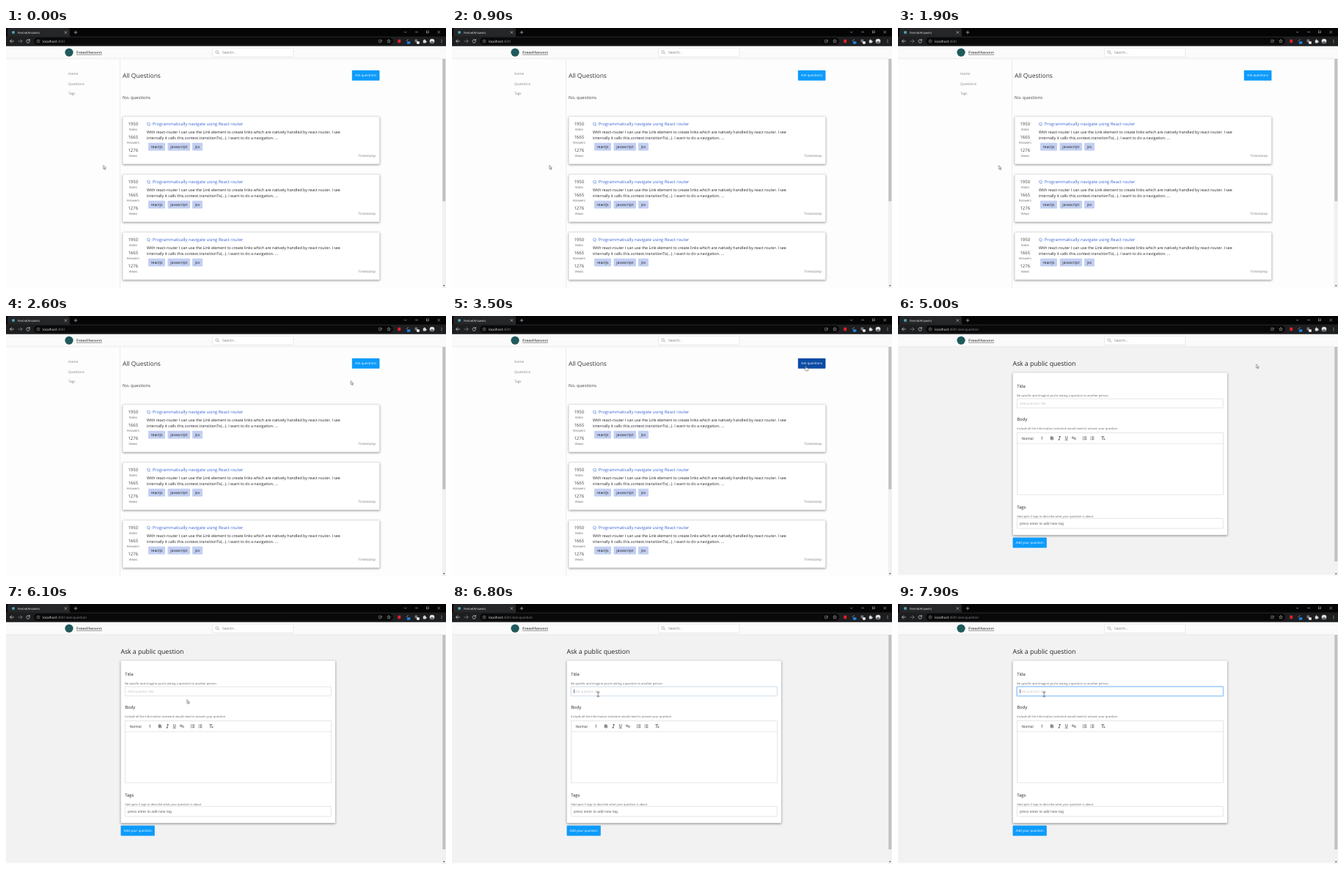
An HTML page that plays this animation: 600x355 px, repeating every 8000 ms.

```html
<!DOCTYPE html>
<html lang="en">
<head>
<meta charset="utf-8">
<title>Questions</title>
<style>
html, body { margin: 0; width: 100%; height: 100%; overflow: hidden; background: #fff; }
svg { display: block; width: 100%; height: 100%; }
text { font-family: "Open Sans", "Noto Sans", sans-serif; text-rendering: geometricPrecision; }
.arial { font-family: "Liberation Sans", Arial, sans-serif; }
.brand { font: bold 5.34px "Liberation Serif", "Times New Roman", serif; text-decoration: underline; }
.mid { text-anchor: middle; }
.medium { font-weight: 500; }
.card { fill: #fff; stroke: #d4d4d4; stroke-width: .4; filter: drop-shadow(0 1.2px 1.6px rgba(0, 0, 0, .42)); }
.line { fill: none; stroke-linecap: round; stroke-linejoin: round; }
.box { fill: #fff; stroke: #d6d6d6; stroke-width: .6; }
</style>
</head>
<body>
<svg id="stage" viewBox="0 0 600 355" preserveAspectRatio="none"></svg>
<script>
const LOOP = 8000;
const BRAND = 'FennelAnswers';

const text = (x, y, size, fill, str, cls = '') =>
  `<text x="${x}" y="${y}" font-size="${size}" fill="${fill}" class="${cls}">${str}</text>`;
const rect = (x, y, w, h, fill, r = 0, more = '') =>
  `<rect x="${x}" y="${y}" width="${w}" height="${h}" rx="${r}" fill="${fill}" ${more}/>`;
const box = (x, y, w, h, cls, r = 0) =>
  `<rect x="${x}" y="${y}" width="${w}" height="${h}" rx="${r}" class="${cls}"/>`;
const dot = (x, y, r, fill) => `<circle cx="${x}" cy="${y}" r="${r}" fill="${fill}"/>`;
const line = (d, stroke, w = .7) =>
  `<path d="${d}" class="line" stroke="${stroke}" stroke-width="${w}"/>`;

function browser() {
  const ink = '#d8d8d8';
  return rect(0, 0, 600, 24.5, '#050505')
    + '<path d="M2 12V3Q2 0 5 0H84Q87 0 87 3V12Z" fill="#252628"/>'
    + rect(0, 11.5, 600, 13, '#1d1e20')
    + rect(38, 13, 490, 10, '#09090a', 5)
    + dot(10, 6, 2, '#4ba6b8')
    + text(16, 7.6, 4.3, '#e6e6e6', BRAND)
    + line('M80 4.6l2.8 2.8m0-2.8l-2.8 2.8', ink, .6)
    + line('M93 6h4m-2-2v4', ink, .6)
    + line('M543 5l1.5 1.5L546 5M558.5 5.5h3M588.8 4.2l2.8 2.8m0-2.8l-2.8 2.8', ink, .5)
    + rect(573.5, 4, 2.8, 2.8, 'none', 0, `stroke="${ink}" stroke-width=".5"`)
    + line('M10.5 18h-5m2.2-2.2L5.5 18l2.2 2.2', ink)
    + line('M17 18h5m-2.2-2.2L22 18l-2.2 2.2', '#8a8a8a')
    + line('M32 16.6a2.3 2.3 0 1 0 .4 2M32.3 15.4v1.6h-1.6', ink)
    + '<circle cx="44" cy="18" r="2" fill="none" stroke="#aaa" stroke-width=".5"/>'
    + line('M44 17.8v1M44 16.9v.1', '#aaa', .5)
    + text(50, 19.7, 4.6, '#f0f0f0', 'localhost<tspan fill="#8b8d90">:3001<tspan id="path">/ask-question</tspan></tspan>')
    + rect(508.5, 16.2, 3.6, 3.6, 'none', .5, 'stroke="#aaa" stroke-width=".5"')
    + line('M510 18.4q.5-1.4 2.6-1.5', '#aaa', .5)
    + line('M522 15.7l.7 1.5 1.6.2-1.2 1.1.3 1.6-1.4-.8-1.4.8.3-1.6-1.2-1.1 1.6-.2z', ink, .45)
    + rect(534.2, 15.8, 4, 4.4, '#e0202f', 1)
    + line('M546 17.5l2.2-1.7', '#999', .9)
    + rect(546.8, 18.2, 4.6, 3.6, '#1b84e0', .8)
    + rect(557.5, 15.6, 3.6, 4, '#777', .6)
    + rect(560, 18.3, 3.8, 3.4, '#f2f2f2', .8)
    + rect(568.8, 16.8, 3.8, 3.6, ink, .5) + dot(570.6, 16.4, 1, ink) + dot(572.9, 18.6, .9, ink)
    + dot(581, 18, 3.3, '#dedede') + '<path d="M578.2 19.6Q581 16.8 583.8 19.6Q581 22.4 578.2 19.6Z" fill="#555"/>'
    + [16.2, 18, 19.8].map(y => dot(594, y, .5, ink)).join('');
}

function header() {
  return rect(0, 24.5, 600, 17.5, '#fafafa')
    + rect(0, 41.6, 595, .6, '#dedede')
    + dot(86, 33.3, 5.6, '#1f5a5c')
    + text(96, 35.3, 5.34, '#555', BRAND, 'brand')
    + rect(281.8, 27.2, 110, 12.3, '#fff', 1, 'stroke="#dcdcdc" stroke-width=".6"')
    + '<circle cx="287.6" cy="32.6" r="1.8" fill="none" stroke="#888" stroke-width=".6"/>'
    + line('M289 34l1.7 1.7', '#888', .6)
    + text(295, 35, 4.8, '#757575', 'Search...');
}

function scrollbar(end) {
  return rect(594.6, 24.5, 5.4, 330.5, '#f1f1f1')
    + rect(595.3, 30, 4, end - 30, '#c1c1c1')
    + '<path d="M595.9 28.7l1.4-1.6 1.4 1.6z" fill="#777"/>'
    + '<path d="M595.9 351.3l1.4 1.6 1.4-1.6z" fill="#444"/>';
}

function question(dy) {
  const stats = [['1950', 'Votes'], ['1665', 'Answers'], ['1276', 'Views']];
  const tags = [['reactjs', 194, 23], ['javascript', 220.5, 30.5], ['jsx', 254, 14]];
  return `<g transform="translate(0 ${dy})">`
    + box(159.2, 121, 350.2, 64.8, 'card', .5)
    + stats.map(([n, label], i) =>
        text(173.3, 133.2 + i * 17.8, 6, '#444', n, 'mid')
        + text(173.3, 139.9 + i * 17.8, 4.4, '#666', label, 'mid')).join('')
    + text(192, 133.1, 5.87, '#3a67d2', 'Q: Programmatically navigate using React router')
    + text(192, 144, 5.32, '#222', 'With react-router I can use the Link element to create links which are natively handled by react router. I see')
    + text(192, 151.8, 5.32, '#222', 'internally it calls this.context.transitionTo(...). I want to do a navigation. ...')
    + tags.map(([name, x, w]) =>
        rect(x, 156.8, w, 10.6, '#c2cff2', .8) + text(x + w / 2, 163.9, 5.2, '#222', name, 'mid')).join('')
    + text(480.5, 175.9, 4.5, '#777', 'Timestamp')
    + '</g>';
}

function listPage() {
  return '<g id="list">' + rect(0, 42, 600, 313, '#fdfdfd')
    + rect(155, 42, .6, 313, '#e2e2e2')
    + ['Home', 'Questions', 'Tags'].map((s, i) => text(85, 64 + i * 13.5, 4.65, '#808080', s)).join('')
    + text(159, 68.3, 8.48, '#333', 'All Questions')
    + text(159, 97.4, 5.9, '#444', 'No. questions')
    + '<rect id="ask" x="471.8" y="57.8" width="37.6" height="14" rx=".8" fill="#0d9bfb"/>'
    + text(490.6, 66.4, 4.5, '#fff', 'Ask questions', 'mid')
    + [0, 79, 158].map(question).join('')
    + scrollbar(236.5) + '</g>';
}

function editorTools() {
  const ink = '#444';
  const rows = [164.9, 166.8, 168.7];
  return text(168.4, 168.7, 5, ink, 'Normal', 'arial medium')
    + `<path d="M195.2 166.2l1.1-1.4 1.1 1.4zM195.2 167.4l1.1 1.4 1.1-1.4z" fill="${ink}"/>`
    + line('M208.8 164.8h1.6a1 1 0 0 1 0 2h-1.6zM208.8 166.8h2a1 1 0 0 1 0 2h-2z', ink, .8)
    + line('M219.6 164.7h2M218.6 168.9h2M220.7 164.7l-1 4.2', ink)
    + line('M228.4 164.5v2a1.3 1.3 0 0 0 2.6 0v-2M228 169.2h3.4', ink)
    + line('M239.6 166l-.7-.7a.9.9 0 0 0-1.3 1.3l1.1 1.1M240 167.4l.8.8a.9.9 0 0 0 1.3-1.3l-1.2-1.2M239 166l1.9 1.9', ink, .75)
    + rows.map(y => line(`M254.2 ${y}h2.8M264.2 ${y}h2.8`, ink)
        + line(`M252.4 ${y - .4}v.8M262.4 ${y}h.1`, ink, .6)).join('')
    + line('M277.4 164.8h3.6M279.4 164.8l-.8 4M280.6 167.4l1.5 1.5m0-1.5l-1.5 1.5', ink);
}

function formPage() {
  const field = (y, label, hint) =>
    text(162.2, y, 5.9, '#222', label, 'medium') + text(162.2, y + 12, 4, '#666', hint);
  return '<g id="form">' + rect(0, 42, 600, 311, '#f2f2f3') + rect(0, 353, 600, 2, '#fbfbfb')
    + text(156.4, 67.7, 8.7, '#222', 'Ask a public question')
    + box(156.6, 77.2, 292.4, 221.8, 'card', .5)
    + field(97.8, 'Title', 'Be specific and imagine you\'re asking a question to another person')
    + field(143.1, 'Body', 'Include all the information someone would need to answer your question')
    + field(263.2, 'Tags', 'Add upto 5 tags to describe what your question is about')
    + box(162.3, 113, 281, 12.4, 'box', .6)
    + '<g id="ring">' + rect(161.8, 112.5, 282, 13.4, 'none', 1.2, 'stroke="#bfdeff" stroke-width="1.4"')
    + rect(162.3, 113, 281, 12.4, '#fff', .6, 'stroke="#6db3fb" stroke-width=".7"') + '</g>'
    + text(166, 120.9, 4.65, '#c9c9c9', 'Add question title', 'arial')
    + '<g id="caret">' + rect(166, 116.6, .6, 5.2, '#222') + '</g>'
    + box(162.3, 159.6, 281, 84.4, 'box') + rect(162.3, 173.8, 281, .6, '#d6d6d6')
    + editorTools()
    + box(162.3, 276.4, 281, 13.6, 'box', .6)
    + text(166, 284.9, 5.05, '#666', 'press enter to add new tag', 'arial')
    + rect(156.5, 302.6, 46.3, 14, '#0d9bfb', .8)
    + text(179.6, 311.2, 4.45, '#fff', 'Add your question', 'mid')
    + scrollbar(335) + '</g>';
}

function pointer() {
  return '<g id="mouse">'
    + '<path id="arrow" d="M0 0V5.1L1.2 4.1 2 5.9 2.9 5.5 2.1 3.7H3.6Z" fill="#fff" stroke="#333" stroke-width=".5"/>'
    + '<path id="hand" d="M-.6 .2Q0-.5 .6 .2V2.4L3 3Q3.6 3.2 3.5 4L3 6.6H0L-1.9 4Q-1.8 3.2-.6 4Z" fill="#fff" stroke="#222" stroke-width=".5"/>'
    + '<path id="beam" d="M-1.4-2.9H1.4M-1.4 2.9H1.4M0-2.9V2.9" class="line" stroke="#333" stroke-width=".65"/>'
    + '</g>';
}

const stage = document.getElementById('stage');
stage.innerHTML = listPage() + formPage() + header() + browser() + pointer();

// steps: [time, value, easing until the next step]
function play(id, prop, steps, easing = 'linear') {
  const frames = steps.map(([t, v, e]) => ({ offset: t / LOOP, [prop]: v, easing: e || easing }));
  frames.push({ offset: 1, [prop]: steps[steps.length - 1][1] });
  document.getElementById(id).animate(frames, { duration: LOOP, iterations: Infinity });
}
const flip = (id, steps) => play(id, 'opacity', steps, 'steps(1, end)');
const at = (x, y) => `translate(${x}px, ${y}px)`;

flip('list', [[0, 1], [5000, 0]]);
flip('form', [[0, 0], [5000, 1]]);
flip('path', [[0, 0], [5000, 1]]);
flip('arrow', [[0, 1], [3300, 0], [5000, 1], [6400, 0]]);
flip('hand', [[0, 0], [3300, 1], [5000, 0]]);
flip('beam', [[0, 0], [6400, 1]]);
flip('caret', [[0, 0], [6800, 1], [7300, 0], [7900, 1]]);
play('ring', 'opacity', [[0, 0], [6750, 0], [7000, 1]]);
play('ask', 'fill', [[0, '#0d9bfb'], [3250, '#0d9bfb'], [3600, '#0a2c82'], [5000, '#0a2c82']]);
play('mouse', 'transform', [
  [0, at(132.8, 187.4)],
  [1850, at(132.8, 187.4), 'ease-in'],
  [2200, at(268, 194)],
  [2300, at(268, 194), 'ease-in-out'],
  [2600, at(470.2, 88.5)],
  [2750, at(470.2, 88.5), 'ease-in-out'],
  [3200, at(474, 74)],
  [3400, at(480, 69), 'ease-out'],
  [4100, at(490.2, 65.6)],
  [4999, at(490.2, 65.6)],
  [5000, at(488.6, 66)],
  [5550, at(488.6, 66), 'ease-in-out'],
  [6100, at(247, 130.5), 'ease-out'],
  [6500, at(199.3, 123.4)]
]);
</script>
</body>
</html>
```
